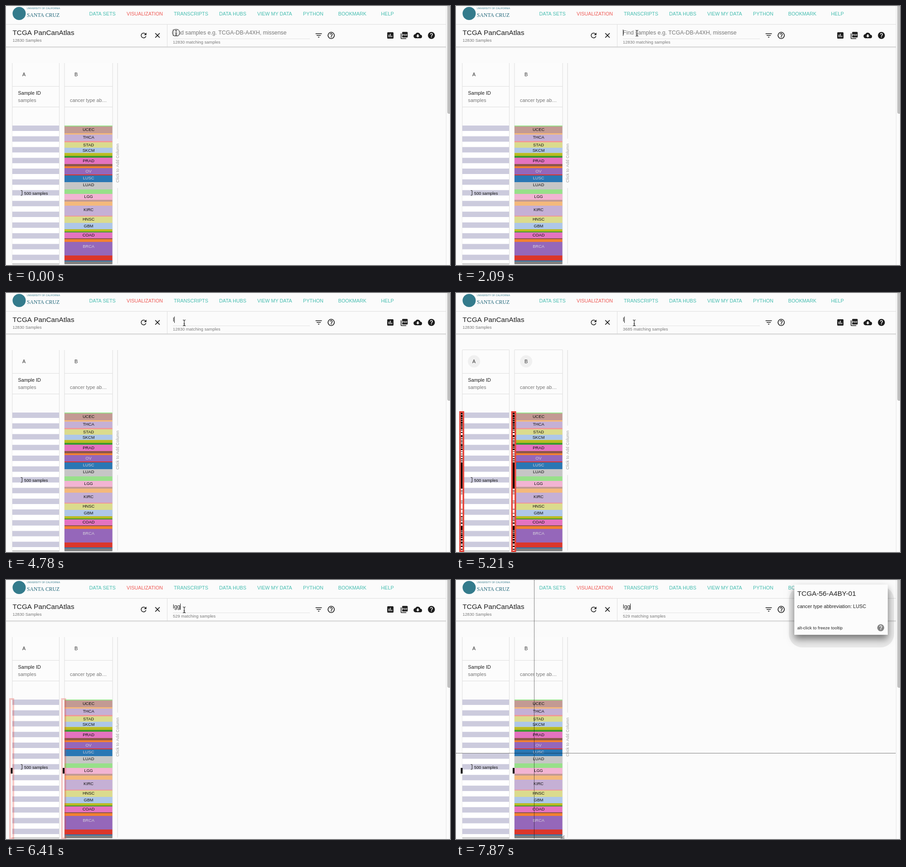
An HTML page with a canvas that plays this animation: 979x572 px, repeating every 8000 ms.

```html
<!DOCTYPE html>
<html lang="en">
<head>
<meta charset="utf-8">
<title>Sample search</title>
<style>
  html, body { margin: 0; width: 100%; height: 100%; overflow: hidden; background: #fbfbfb; }
  canvas { display: block; }
</style>
</head>
<body>
<canvas id="stage" width="979" height="572"></canvas>
<script>
const ctx = document.getElementById('stage').getContext('2d');
const LOOP = 8000;
const SANS = '"Liberation Sans", Arial, sans-serif';
const SERIF = '"Liberation Serif", Times, serif';
const INK = '#1c1c1c', GREY = '#777', LINE = '#dedede';
const BIG = 15.3, FIELD = 12.29, BODY = 10.75, SMALL = 9.22;

const C = {
  mint: '#98e08a', tan: '#c39a93', peach: '#f4b97c', lilac: '#c5b0d5', salmon: '#f09a98',
  khaki: '#dbdb8d', sky: '#aec7e8', olive: '#b9bb22', green: '#3a9a30', pink: '#e473c0',
  brown: '#8c564b', orange: '#f28030', purple: '#9567ba', red: '#da372b', blue: '#2a77b4',
  silver: '#c6c6c6', rose: '#f2b4d3', grey: '#7f7f7f'
};

// top, colour, label, label centre
const BANDS = [
  [264, 'mint'], [266, 'tan', 'UCEC', 273], [281, 'peach'], [284, 'lilac', 'THCA', 290],
  [298, 'salmon'], [301, 'khaki', 'STAD', 307], [313, 'sky', 'SKCM', 319], [324.5, 'olive'],
  [331, 'green'], [335, 'pink', 'PRAD', 342], [349, 'brown'], [354, 'orange'],
  [358, 'purple', 'OV', 364.5], [372, 'red'], [374, 'blue', 'LUSC', 380],
  [389, 'silver', 'LUAD', 395], [405, 'mint'], [415, 'rose', 'LGG', 421], [428, 'tan'],
  [432, 'peach'], [441, 'lilac', 'KIRC', 450], [463, 'salmon'], [465, 'khaki', 'HNSC', 471],
  [479, 'sky', 'GBM', 486], [493, 'olive'], [498, 'green'], [500, 'pink', 'COAD', 506],
  [513, 'brown'], [515, 'orange'], [521, 'purple', 'BRCA', 531], [551, 'red'],
  [562, 'blue'], [564, 'grey'], [569]
];

const NAV = [
  ['DATA SETS', 183.5], ['VISUALIZATION', 266], ['TRANSCRIPTS', 370], ['DATA HUBS', 470],
  ['VIEW MY DATA', 554], ['PYTHON', 655], ['BOOKMARK', 732.5], ['HELP', 827]
];

// start time, value: each holds until the next one
const CURSOR = [
  [0, 'beam', 375, 59], [150, 'beam', 382, 63], [300, 'arrow', 399, 98], [450, 'arrow', 411, 148],
  [1800, 'arrow', 409, 136], [1950, 'arrow', 402, 92], [2090, 'beam', 399, 60],
  [2240, 'beam', 403, 48], [2390, 'beam', 389, 53], [2540, 'beam', 371, 58],
  [2690, 'beam', 367, 58], [2830, 'beam', 378, 57], [2980, 'beam', 393, 66],
  [7150, 'beam', 390, 70], [7300, 'arrow', 382, 84], [7450, 'arrow', 362, 107],
  [7580, 'hand', 240, 269], [7720, 'cross', 180, 377], [7870, 'cross', 172, 382]
];
const TYPED = [[0, ''], [4780, 'l'], [5360, 'lg'], [5960, 'lgg']];
const FOUND = [[0, 12830], [4930, 3685], [5660, 536], [6110, 529]];
const GLOW = [
  [0, 0], [4930, .3], [5060, .7], [5210, 1], [5510, .4], [5660, 1], [5810, .7],
  [5960, .3], [6110, 1], [6410, .3], [6550, 0]
];
const CARET_FLIPS = [300, 750, 1350, 1800, 2240, 2690, 3280, 3730, 4330, 4780, 6550, 7000, 7580, 7870];

const at = (keys, t) => keys.filter(k => k[0] <= t).pop();

function rect(x, y, w, h, color) {
  ctx.fillStyle = color;
  ctx.fillRect(x, y, w, h);
}

function disc(x, y, r, color) {
  ctx.fillStyle = color;
  ctx.beginPath();
  ctx.arc(x, y, r, 0, 7);
  ctx.fill();
}

function rounded(x, y, w, h, r, color) {
  ctx.fillStyle = color;
  ctx.beginPath();
  ctx.roundRect(x, y, w, h, r);
  ctx.fill();
}

function stroke(path, color, width) {
  ctx.strokeStyle = color;
  ctx.lineWidth = width;
  ctx.stroke(new Path2D(path));
}

function text(str, x, y, size, color, { align = 'left', gap = 0, family = SANS, weight = '' } = {}) {
  ctx.font = `${weight} ${size}px ${family}`;
  ctx.letterSpacing = gap + 'px';
  ctx.textAlign = align;
  ctx.fillStyle = color;
  ctx.fillText(str, x, y);
}

// Icons live on a 24-unit grid centred on (x, y)
function icon(x, y, draw, scale = .768) {
  ctx.save();
  ctx.translate(x, y);
  ctx.scale(scale, scale);
  ctx.translate(-12, -12);
  draw();
  ctx.restore();
}

function question(color, y) {
  stroke(`M9 ${y}a3 3 0 1 1 5.2 2.1C13 ${y + 3.3} 12 ${y + 3.8} 12 ${y + 6}`, color, 2);
  rect(11, y + 7, 2, 2, color);
}

const icons = {
  refresh() {
    stroke('M16.9 7.1A7 7 0 1 0 18.7 14', INK, 2);
    ctx.fillStyle = INK;
    ctx.fill(new Path2D('M20 4v7h-7z'));
  },
  close() { stroke('M5.7 5.7L18.3 18.3M18.3 5.7L5.7 18.3', INK, 2); },
  filter() { stroke('M3 7H21M6 12H18M10 17H14', INK, 2); },
  outline() {
    stroke('M12 3a9 9 0 1 0 .01 0z', INK, 2);
    question(INK, 9.5);
  },
  chart() {
    rounded(3, 3, 18, 18, 2, INK);
    stroke('M8 10V17M12 7V17M16 13V17', '#fbfbfb', 2);
  },
  pdf() {
    rounded(6, 2, 16, 16, 2, INK);
    stroke('M3 6V20a1 1 0 0 0 1 1H18', INK, 2);
    text('PDF', 14, 12.8, 7.6, '#fbfbfb', { align: 'center', weight: 'bold' });
  },
  cloud() {
    ctx.fillStyle = INK;
    ctx.fill(new Path2D('M19.3 10A7.5 7.5 0 0 0 5.3 8A6 6 0 0 0 6 20H19A5 5 0 0 0 19.3 10z'));
    ctx.fillStyle = '#fbfbfb';
    ctx.fill(new Path2D('M17 13l-5 5-5-5h3V9h4v4z'));
  },
  help(color = INK) {
    disc(12, 12, 10, color);
    question('#fbfbfb', 9);
  }
};

function header() {
  disc(29, 16.5, 14.5, '#347b8c');
  text('UNIVERSITY OF CALIFORNIA', 46, 7, 5.25, '#347b8c');
  text('SANTA CRUZ', 46, 24, 11.7, '#1f6679', { family: SERIF });
  NAV.forEach(([label, x], i) =>
    text(label, x, label === 'BOOKMARK' ? 20.5 : 21, BODY, i === 1 ? '#ee5a55' : '#45bdb0'));

  rect(0, 40, 970, 1, LINE);
  rect(355, 41, 1, 49, LINE);
  rect(0, 89.5, 970, 2, '#d2d2d2');
  rect(0, 91.5, 970, 1, '#ececec');
  text('TCGA PanCanAtlas', 14.5, 63.5, BIG, INK);
  text('12830 Samples', 14.5, 79, SMALL, GREY);

  icon(303.5, 65, icons.refresh);
  icon(334, 65, icons.close);
  icon(689.5, 65, icons.filter);
  icon(717, 65, icons.outline);
  icon(847.5, 65, icons.chart);
  icon(878, 65, icons.pdf);
  icon(908, 65, icons.cloud);
  icon(938, 65, () => icons.help());

  rect(970, 0, 1, 572, '#e4e4e4');
  rounded(973, -10, 8, 248, 4, '#c1c1c1');
}

function search(t) {
  const typed = at(TYPED, t)[1];
  if (typed) text(typed, 368, 63, FIELD, INK);
  else text('Find samples e.g. TCGA-DB-A4XH, missense', 368, 63, FIELD, GREY);
  rect(368, 72, 302, 1, '#e2e2e2');
  text(at(FOUND, t)[1] + ' matching samples', 368, 82.5, SMALL, GREY, { gap: .1 });

  if (CARET_FLIPS.filter(f => f <= t).length % 2 === 0) {
    ctx.font = `${FIELD}px ${SANS}`;
    ctx.letterSpacing = '0px';
    rect(Math.round(368 + ctx.measureText(typed).width), 52, 1, 14, '#222');
  }
}

function card(x, w, letter, raised) {
  rect(x, 126, w, 443, '#fcfcfc');
  rect(x - .5, 126, 1, 443, LINE);
  rect(x + w - .5, 126, 1, 443, LINE);
  rect(x, 177, w, 1, LINE);
  rect(x, 222.5, w, 1, LINE);
  if (raised) {
    rect(x, 125, w, 1, LINE);
    disc(x + 25.7, 151, 13.5, '#f0f0f0');
  }
  text(letter, x + 25.7, 155, BODY, '#333', { align: 'center' });
}

function columns(t) {
  const raised = t >= 4930 && t < 5660;
  card(14, 103.5, 'A', raised);
  text('Sample ID', 26.5, 196, BODY, INK);
  text('samples', 26.5, 211.5, BODY, GREY);
  rect(14, 264, 103, 305, '#fff');
  for (let i = 0; i < 13; i++) rect(14, 264 + i * 23.77, 103, 11.9, '#cccbdd');
  stroke('M32.5 407.5H35.5V418H32.5', '#222', 1);
  text('500 samples', 40, 417, SMALL, '#111');

  card(129, 106, 'B', raised);
  text('cancer type ab…', 141, 211.5, BODY, GREY);
  BANDS.slice(0, -1).forEach(([y, color], i) => rect(129, y, 105.5, BANDS[i + 1][0] - y, C[color]));
  for (const [, color, label, mid] of BANDS) {
    if (!label) continue;
    const pale = color === 'purple' || color === 'blue';
    text(label, 182, mid + 3.3, SMALL, pale ? '#d5d0dc' : '#111', { align: 'center' });
  }
  rect(14, 569, 103.5, 1.2, '#8f8f8f');
  rect(129, 569, 105.5, 1.2, '#777');

  rect(245.5, 126, 1, 167, '#d8d8d8');
  rect(245.5, 402, 1, 167, '#d8d8d8');
  ctx.save();
  ctx.translate(248.7, 390);
  ctx.rotate(-Math.PI / 2);
  text('Click to Add Column', 0, 0, SMALL, '#999', { gap: .14 });
  ctx.restore();
}

function scatter(x) {
  let seed = 11;
  const random = () => (seed = seed * 16807 % 2147483647) / 2147483647;
  for (let y = 264; y < 568; y++) {
    const density = y < 340 ? .62 : y < 374 ? .4 : y < 432 ? 1 : y < 493 ? .12 : .62;
    if (random() < density) rect(x, y, 4, 1, '#000');
  }
}

function matches(t) {
  const found = at(FOUND, t)[1], glow = at(GLOW, t)[1];
  if (found === 12830) return;
  for (const x of [10.5, 125]) {
    if (found === 3685) {
      rect(x, 264, 4, 305, '#fff');
      scatter(x);
    } else {
      rect(x, 415, 4, 12.5, '#000');
      if (found === 536) for (const y of [269.5, 413.5, 544.5, 562.5, 565.5]) rect(x, y, 4, 1, '#222');
    }
    ctx.globalAlpha = glow;
    ctx.strokeStyle = '#e5473c';
    ctx.lineWidth = 3.6;
    ctx.strokeRect(x - 1.6, 262.8, 7.4, 307.6);
    ctx.globalAlpha = 1;
  }
}

function tooltip() {
  rounded(734, 14, 232, 135, 30, 'rgba(0,0,0,.07)');
  ctx.save();
  ctx.shadowColor = 'rgba(0,0,0,.5)';
  ctx.shadowBlur = 16;
  ctx.shadowOffsetY = 9;
  rect(746, 10, 206, 111, '#fcfcfc');
  ctx.restore();
  text('TCGA-56-A4BY-01', 752.5, 35, BIG, '#222');
  text('cancer type abbreviation: LUSC', 752.5, 62, BODY, '#222');
  text('alt-click to freeze tooltip', 752.5, 109, SMALL, '#222', { gap: .14 });
  icon(936.5, 105.5, () => icons.help('#858585'));
}

function crosshair(x, y) {
  tooltip();
  ctx.setLineDash([1, 1]);
  stroke(`M${x + .5} 0V572M0 ${y + .5}H970`, '#000', 1);
  ctx.setLineDash([]);
  stroke('M231 572L239 564M234 572L239 567M237 572L239 570', '#333', 1);
}

function pointer(t) {
  const [, kind, x, y] = at(CURSOR, t);
  if (kind === 'cross') return crosshair(x, y);
  ctx.save();
  ctx.translate(x, y);
  if (kind === 'beam') {
    if (t < 150) {
      disc(0, 0, 8, 'rgba(251,251,251,.65)');
      stroke('M0 -8a8 8 0 1 0 .01 0z', '#444', 1.2);
    }
    const beam = 'M-3 -6.5Q0 -6.5 0 -4.5Q0 -6.5 3 -6.5M0 -4.5V4.5M-3 6.5Q0 6.5 0 4.5Q0 6.5 3 6.5M-1.5 2H1.5';
    stroke(beam, 'rgba(255,255,255,.8)', 3);
    stroke(beam, '#111', 1.1);
  } else {
    const shape = new Path2D(kind === 'arrow'
      ? 'M0 0V12L2.8 9.4L4.7 13.6L6.6 12.8L4.8 8.7H8.5z'
      : 'M-2 -6Q-.6 -7 0 -5L1 -1.5Q2.3 -2.6 3 -1Q4.4 -1.8 5 -.2Q6.4 -.6 6.3 1.5L5.5 6H-1L-4.5 1.2Q-4.3 -.4 -2.2 1.2L-1.2 2L-2.7 -4Q-3 -5.6 -2 -6z');
    ctx.fillStyle = kind === 'arrow' ? '#111' : '#fff';
    ctx.strokeStyle = kind === 'arrow' ? '#fff' : '#111';
    ctx.lineWidth = 1.1;
    ctx.fill(shape);
    ctx.stroke(shape);
    if (kind === 'hand') stroke('M1.2 2V4.5M3 2V4.5', '#111', .8);
  }
  ctx.restore();
}

function frame() {
  const t = performance.now() % LOOP;
  rect(0, 0, 979, 572, '#fbfbfb');
  header();
  search(t);
  columns(t);
  matches(t);
  pointer(t);
  requestAnimationFrame(frame);
}
frame();
</script>
</body>
</html>
```
